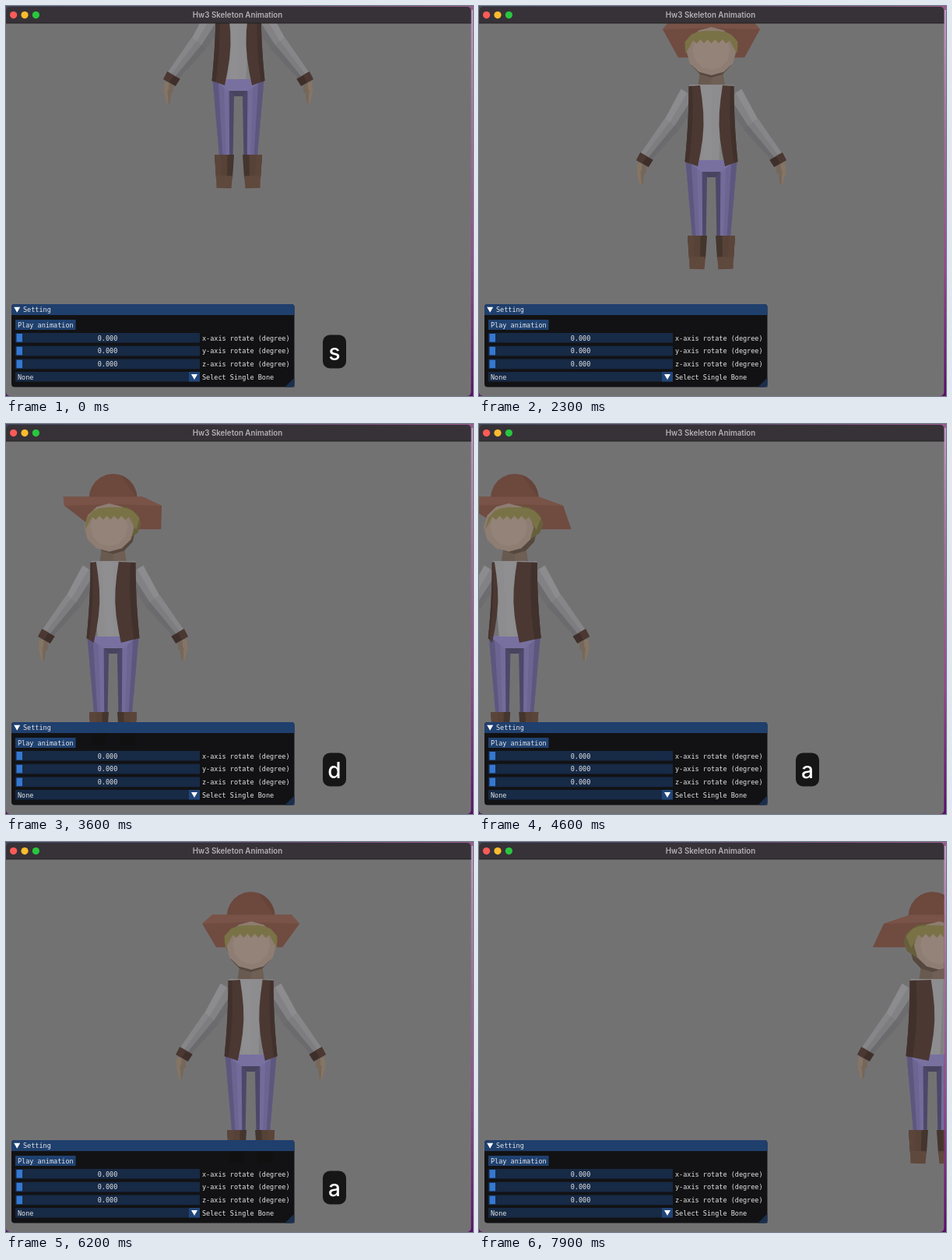
Recreate the animation shown at these times as an HTML page with a canvas. Size 600 by 501 pixels, loop 8000 ms.

```html
<!DOCTYPE html>
<html lang="en">
<head>
<meta charset="utf-8">
<title>Skeleton Animation</title>
<style>
html, body { margin: 0; width: 100%; height: 100%; overflow: hidden; background: #737273; }
canvas { display: block; width: 600px; height: 501px; }
</style>
</head>
<body>
<canvas id="stage" width="600" height="501"></canvas>
<script>
const ctx = document.getElementById('stage').getContext('2d');
const LOOP = 8000, STEP = 100, CENTER = 298.5;
const MONO = '8.5px "DejaVu Sans Mono", monospace';
const BOTH = [-1, 1];

// time, horizontal and vertical offset of the figure
const path = [
  [0, 0, -195], [100, 0, -195], [1250, 0, 0], [1600, 0, 0], [2200, 0, -91],
  [2300, 0, -91], [2650, 0, -16], [3600, -161, -16], [4380, -289, -16],
  [5400, -121, -16], [6900, 136, -16], [7765, 284, -16], [8000, 284, -16]
];
const keys = [['s', 0, 200], ['s', 1500, 2200], ['d', 2700, 4300], ['a', 4500, 7700]];

let dx = 0, dy = 0;

const mix = (a, b, k) => a + (b - a) * k;
const range = (n, f) => Array.from({ length: n + 1 }, (_, i) => f(i / n, i));

function locate(t) {
  const i = path.findIndex(p => p[0] > t);
  const [t0, x0, y0] = path[i - 1], [t1, x1, y1] = path[i];
  const k = (t - t0) / (t1 - t0);
  dx = mix(x0, x1, k);
  dy = mix(y0, y1, k);
}

// points are [x from the body axis, y, depth]; nearer points shift further sideways
function poly(color, pts, side = 1) {
  ctx.beginPath();
  for (const [x, y, z = 0] of pts) ctx.lineTo(CENTER + x * side + dx * (1 + z), y + dy);
  ctx.closePath();
  ctx.fillStyle = color;
  ctx.fill();
}

// tapered segment with facets coloured from the inner to the outer edge
function limb(side, [x0, y0, r0], [x1, y1, r1], colors) {
  const len = Math.hypot(x1 - x0, y1 - y0);
  const nx = (y1 - y0) / len, ny = (x0 - x1) / len;
  colors.forEach((color, i) => {
    const u = -1 + 2 * i / colors.length;
    poly(color, [
      [x0 + nx * r0 * u, y0 + ny * r0 * u], [x0 + nx * r0, y0 + ny * r0],
      [x1 + nx * r1, y1 + ny * r1], [x1 + nx * r1 * u, y1 + ny * r1 * u]
    ], side);
  });
}

function oval(color, y, rx, ry, z = 0, from = 0, to = 2) {
  poly(color, range(12, k => {
    const a = mix(from, to, k) * Math.PI;
    return [rx * Math.cos(a), y + ry * Math.sin(a), z];
  }));
}

function legs() {
  for (const s of BOTH) {
    limb(s, [19, 289, 14], [15.5, 392, 8.5], ['#4d4869', '#736c9a', '#6c6592', '#5d577e']);
    limb(s, [18, 386, 12.5], [18, 416, 10.5], ['#44352d', '#574237', '#5b453a']);
    limb(s, [18, 413, 10.5], [18.5, 429, 9.5], ['#5f483c']);
  }
  limb(1, [0, 302, 13], [0, 311, 5], ['#48445f']);
  limb(1, [0, 288, 33], [0, 304, 13], ['#7871a0']);
}

function arms() {
  for (const s of BOTH) {
    limb(s, [89, 293, 6], [90, 306, 6.5], ['#75685b', '#857566']);
    limb(s, [91, 303, 5.5], [90, 320, 2], ['#75685b', '#857566']);
    limb(s, [27, 205, 14], [53, 247, 11], ['#6d6c6f', '#828184', '#8c8b8d']);
    limb(s, [51, 243, 11.5], [85, 286, 8], ['#6b6a6d', '#7d7c7f', '#868588']);
    limb(s, [83, 284, 9.5], [88.5, 293.5, 9], ['#3f2f2a', '#4c3832']);
  }
}

function vest(side, color, reach) {
  const inner = range(6, k => [14.5 + 3 * k - 6 * Math.sin(Math.PI * k), 193 + 104 * k, 0.045]);
  const outer = range(6, k => [29 + 5 * k * k, 194 + 97 * k, 0]);
  const edge = inner.map((p, i) => p.map((v, j) => mix(v, outer[i][j], reach)));
  poly(color, [...edge, ...outer.reverse()], side);
}

function torso() {
  limb(1, [0, 192, 28], [0, 289, 20], ['#8d8c8e', '#8f8e90', '#8d8c8e', '#808082']);
  for (const s of BOTH) {
    vest(s, '#4b3832', 0);
    vest(s, '#41312c', 0.7);
  }
}

function hat() {
  oval('#6c483d', 112, 31, 32, 0, 1, 2);
  oval('#66443a', 112, 31, 32, 0, 1.6, 2);
  // the brim opens wider the higher it stands above the eye
  const open = 1 - dy * 0.0027;
  const rim = [[51, -11, 0.08], [62.5, 0, 0], [42.5, 29, -0.12]]
    .map(([x, v, z]) => [x, 121 + v * open, z]);
  const mirror = rim.map(([x, y, z]) => [-x, y, z]).reverse();
  const [front, tip] = rim;
  poly('#704b40', [...rim, ...mirror]);
  poly('#795347', [front, tip, [0, 119, 0], mirror[1], mirror[2]]);
}

function head() {
  limb(1, [0, 172, 14], [0, 192, 17], ['#695a50', '#6f5f54']);
  oval('#56483f', 152, 29, 31);
  oval('#665f3b', 144, 34.5, 24, -0.01);
  oval('#8e7d72', 149, 32, 31, 0.03);
  oval('#948378', 148, 24, 25, 0.03);
  const top = range(8, k => [mix(-34, 34, k), 123 + 14 * (2 * k - 1) ** 4]);
  const fringe = range(14, (k, i) =>
    [mix(33, -33, k), 136 + 18 * (2 * k - 1) ** 8 + (i % 2 ? 3 : -2), 0.02]);
  poly('#7a7247', [...top, ...fringe]);
}

function text(str, x, y, font, color, align = 'left') {
  ctx.font = font;
  ctx.fillStyle = color;
  ctx.textAlign = align;
  ctx.fillText(str, x, y);
}

function rect(color, x, y, w, h, r = 0) {
  ctx.beginPath();
  ctx.roundRect(x, y, w, h, r);
  ctx.fillStyle = color;
  ctx.fill();
}

function arrow(x, y) {
  ctx.beginPath();
  ctx.moveTo(x - 4, y - 3.5);
  ctx.lineTo(x + 4, y - 3.5);
  ctx.lineTo(x, y + 3.5);
  ctx.fillStyle = '#fff';
  ctx.fill();
}

function fade(x, y, colors) {
  const g = ctx.createLinearGradient(0, 0, x, y);
  colors.forEach((c, i) => g.addColorStop(i / (colors.length - 1), c));
  return g;
}

function backdrop() {
  rect(fade(0, 501, ['#c39ac6', '#a0709a', '#964690', '#5a0c6a']), 0, 0, 600, 501);
  rect(fade(600, 0, ['#3f4660', '#574868', '#9a5a90']), 0, 0, 600, 5);
  rect('#737273', 0, 1, 597.5, 500, 5);
}

function titleBar() {
  rect('#363237', 0, 1, 597.5, 21, [5, 5, 0, 0]);
  rect('#222023', 0, 21.5, 597.5, 1);
  ['#fc5b57', '#fdbc2e', '#29c73f'].forEach((c, i) => rect(c, 5 + i * 14.4, 7, 9.2, 9.2, 4.6));
  text('Hw3 Skeleton Animation', 297.5, 15, '600 9.75px Inter, sans-serif', '#b4b1b5', 'center');
}

function panel() {
  const white = '#e6e6e6', field = '#172a46';
  const row = i => 420 + i * 16.8;
  const label = (str, x, y, align) => text(str, x, y + 9.5, MONO, white, align);
  rect('rgba(13,13,15,.95)', 7, 383, 363.5, 106.5, 4);
  rect('#1f3f6d', 7, 383, 363.5, 14, [4, 4, 0, 0]);
  arrow(14.2, 390.3);
  label('Setting', 22, 383.8);
  rect('#1f4170', 12, 403, 77.5, 13);
  label('Play animation', 15, 403.1);
  ['x', 'y', 'z'].forEach((axis, i) => {
    const y = row(i);
    rect(field, 12, y, 237, 12.6);
    rect('#3578d0', 13.5, y + 1, 7.5, 10.6);
    label('0.000', 130.5, y, 'center');
    label(axis + '-axis rotate (degree)', 252, y);
  });
  const y = row(3) - 0.4;
  rect(field, 12, y, 223, 12.6);
  rect('#214578', 235, y, 14, 12.6);
  arrow(242, y + 6.5);
  label('None', 15, y);
  label('Select Single Bone', 252, y);
  ctx.beginPath();
  ctx.moveTo(358.5, 489.5);
  ctx.lineTo(370.5, 489.5);
  ctx.lineTo(370.5, 477.5);
  ctx.fillStyle = '#1a2f4d';
  ctx.fill();
}

function keyCap(t) {
  const key = keys.find(k => t >= k[1] && t < k[2]);
  if (!key) return;
  rect('#161617', 407, 422.5, 30, 43, 9);
  text(key[0], 422, 455, '500 28px Inter, sans-serif', '#fff', 'center');
}

function draw(now) {
  const t = Math.floor((now % LOOP) / STEP) * STEP;
  locate(t);
  backdrop();
  ctx.save();
  ctx.beginPath();
  ctx.rect(0, 22, 597.5, 479);
  ctx.clip();
  legs();
  arms();
  torso();
  hat();
  head();
  ctx.restore();
  titleBar();
  panel();
  keyCap(t);
}

const start = performance.now();
function tick() {
  draw(performance.now() - start);
  requestAnimationFrame(tick);
}
tick();
</script>
</body>
</html>
```
